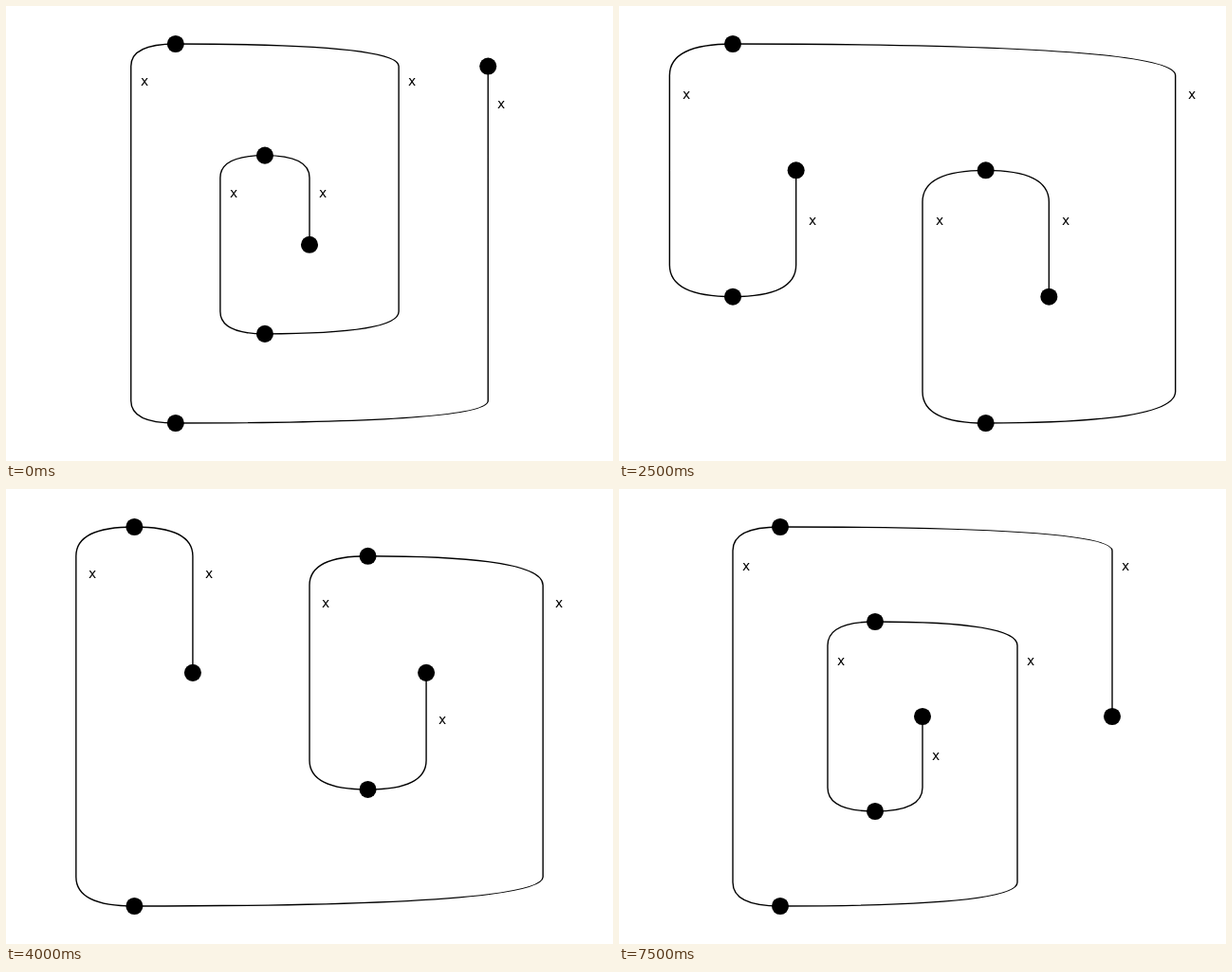
An HTML page for the animation above (8 s loop, 640 px wide and 480 px high).

```html
<!DOCTYPE html>
<html lang="en">
<head>
<meta charset="utf-8">
<title>Meander</title>
<style>
  html, body { margin: 0; width: 100%; height: 100%; overflow: hidden; background: #fff; }
  svg { display: block; }
  path { fill: none; stroke: #000; stroke-width: 1.39; stroke-linejoin: round; }
  text { font: 13.89px "DejaVu Sans", sans-serif; }
</style>
</head>
<body>
<svg id="stage" width="640" height="480" viewBox="0 0 640 480"></svg>
<script>
const STEP = 500;
const SPIRAL = [4, 0, 3, 1, 2];
const HOOKS = [1, 0, 4, 2, 3];

// Columns visited in turn, and the levels where the curve starts, turns and ends.
const pose = columns => (...levels) => ({ columns, levels });
const spiral = pose(SPIRAL);
const hooks = pose(HOOKS);
const poses = [
  spiral(0.25, 4.25, 0, 3.25, 1.25, 2.25),
  spiral(1, 4, 0, 3, 1, 2),
  spiral(2, 4, 0, 3, 1, 2),
  hooks(3, 4, 0, 3, 1, 2),
  hooks(2, 3, 0, 3, 1, 2),
  hooks(1, 2, 0, 3, 1, 2),
  hooks(3, 1.75, 4, 0, 2, 1),
  hooks(2, 0.75, 3, 0, 2, 1),
  hooks(1.25, 0, 3.25, 0.25, 2.25, 1.25),
  ...[1, 2, 3, 4, 4, 3, 2].map(end => spiral(end, 0, 4, 1, 3, 2))
];

const ceil = v => Math.ceil(v - 1e-6);

function draw({ columns, levels }) {
  const unit = 400 / Math.max(...levels);
  const xs = columns.map(c => 320 + (c - 2) * unit);
  const ys = levels.map(l => 40 + l * unit);
  const last = xs.length;
  const dots = [[xs[0], ys[0]]];
  let line = `M${xs[0]} ${ys[0]}`;

  for (let i = 1; i < last; i++) {
    const y = ys[i];
    const x = Math.min(xs[i - 1], xs[i]) + unit / 2;
    const side = y + (y < ys[i + 1] ? 1 : -1) * unit / 4;
    line += `V${side}Q${xs[i - 1]} ${y} ${x} ${y}Q${xs[i]} ${y} ${xs[i]} ${side}`;
    dots.push([x, y]);
  }
  line += `V${ys[last]}`;
  dots.push([xs[last - 1], ys[last]]);

  const labels = xs.map((x, i) => {
    const top = Math.min(ys[i], ys[i + 1]);
    return `<text x="${ceil(x + 0.1 * unit)}" y="${ceil(top + 0.35 * unit + 10.6)}">x</text>`;
  });
  const circles = dots.map(([x, y]) => `<circle cx="${x}" cy="${y}" r="9.03"/>`);
  document.getElementById("stage").innerHTML =
    `<path d="${line}"/>` + circles.join("") + labels.join("");
}

let shown = -1;
function tick() {
  const index = Math.floor(performance.now() / STEP) % poses.length;
  if (index !== shown) draw(poses[shown = index]);
  requestAnimationFrame(tick);
}
tick();
</script>
</body>
</html>
```
